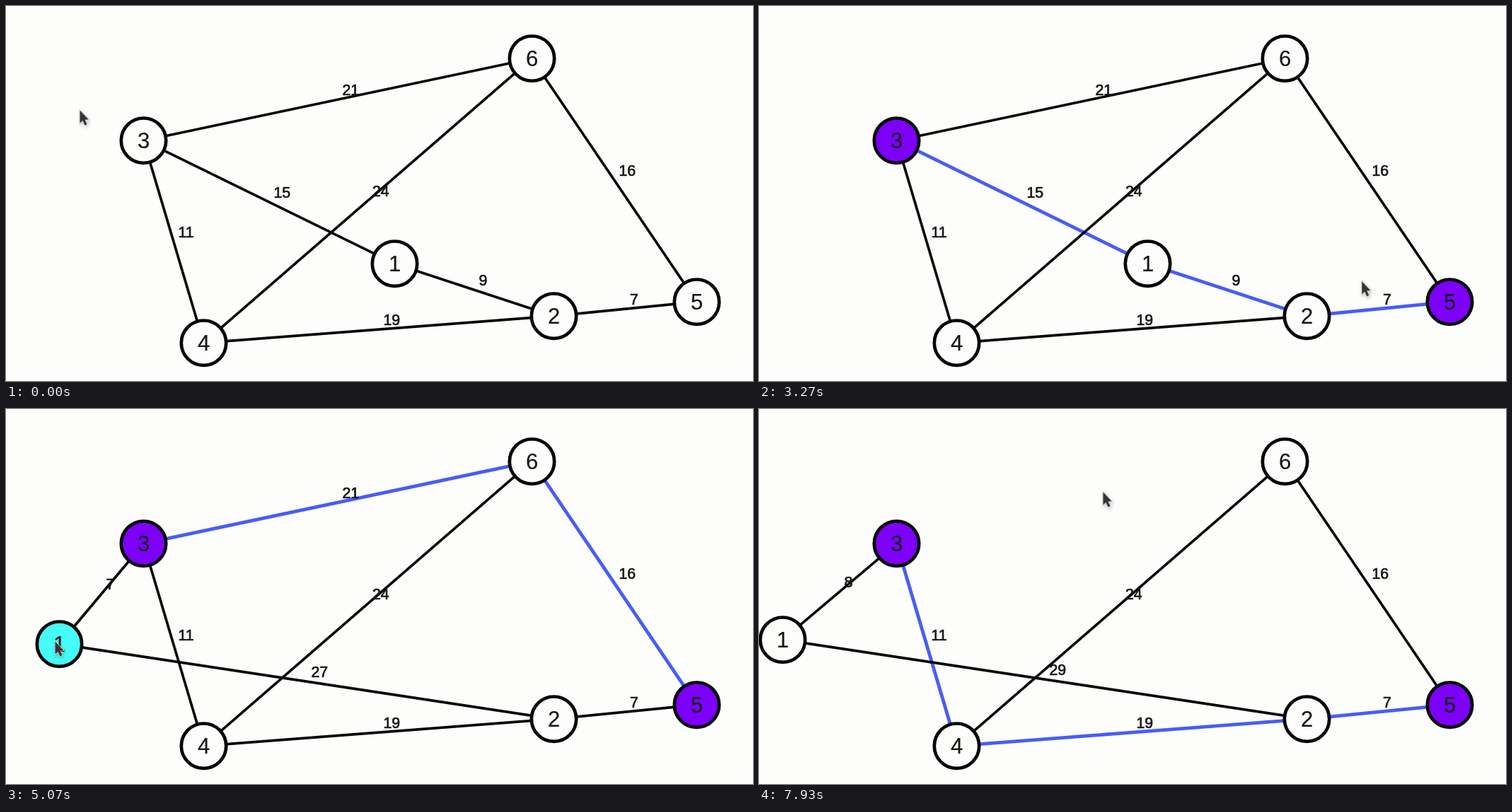
Write an HTML page with a canvas that moves like this. It is 1056x530 px and loops after 8 s.

```html
<!DOCTYPE html>
<html lang="en">
<head>
<meta charset="utf-8">
<title>Shortest path</title>
<style>
  html, body { margin: 0; width: 100%; height: 100%; overflow: hidden; background: #fdfdfb; }
  canvas { display: block; }
</style>
</head>
<body>
<canvas id="stage" width="1056" height="530"></canvas>
<script>
const ctx = document.getElementById('stage').getContext('2d');
const LOOP = 8000;
const FONT = '"Liberation Sans", Arial, sans-serif';
const PAPER = '#fdfdfb', INK = '#060606', TEXT = '#161616';
const BLUE = '#475cfa', PURPLE = '#7d00fb', CYAN = '#45fcf8';
const UNIT = 25.55; // pixels per unit of edge weight

// Moments in ms
const PICK_START = 930, PICK_END = 2130, GRAB = 4270, DROP = 5700, CUT = 7450;
const LAG = 60;

const home = {
  1: [549, 364], 2: [774, 438], 3: [194, 190],
  4: [279, 476], 5: [976, 418], 6: [743, 74]
};
const edges = ['36', '31', '34', '46', '12', '42', '25', '65'];
const routes = [['31', '12', '25'], ['36', '65'], ['34', '42', '25']];

// Pointer moves: begin, end, then where it comes to rest
const moves = [
  [70, 650, 196, 166],
  [1060, 1794, 972, 400],
  [2828, 4098, 543, 360],
  [4330, 4410, 526, 353],
  [4410, 4470, 511, 361],
  [4470, 5000, 69, 328],
  [5170, 5450, 27, 322],
  [5750, 6530, 437, 220],
  [6530, 7100, 486, 117]
];

const clamp = (v, lo, hi) => Math.min(Math.max(v, lo), hi);
const ease = u => u * u * (3 - 2 * u);

function pointerAt(t) {
  return moves.reduce(([x, y], [begin, end, toX, toY]) => {
    const k = ease(clamp((t - begin) / (end - begin), 0, 1));
    return [x + (toX - x) * k, y + (toY - y) * k];
  }, [104, 147]);
}

function layout(t) {
  if (t < GRAB) return home;
  const [x, y] = pointerAt(clamp(t - LAG, GRAB, DROP));
  return { ...home, 1: [x + 6, y + 4] };
}

function weight(nodes, [a, b]) {
  const p = nodes[a], q = nodes[b];
  return Math.floor(Math.hypot(p[0] - q[0], p[1] - q[1]) / UNIT);
}

function shortest(nodes, live) {
  const cost = r => r.reduce((sum, e) => sum + weight(nodes, e), 0);
  return routes.filter(r => r.every(e => live.includes(e)))
    .reduce((best, r) => cost(r) < cost(best) ? r : best);
}

function write(text, x, y, size, align, bold) {
  ctx.font = `${size}px ${FONT}`;
  ctx.textAlign = align;
  ctx.fillStyle = ctx.strokeStyle = TEXT;
  ctx.lineWidth = bold;
  ctx.fillText(text, x, y);
  ctx.strokeText(text, x, y);
}

function drawEdge(nodes, e, hot) {
  ctx.strokeStyle = hot ? BLUE : INK;
  ctx.lineWidth = hot ? 4.8 : 3.7;
  ctx.beginPath();
  ctx.moveTo(...nodes[e[0]]);
  ctx.lineTo(...nodes[e[1]]);
  ctx.stroke();
}

function drawWeight(nodes, e) {
  const p = nodes[e[0]], q = nodes[e[1]];
  write(weight(nodes, e), (p[0] + q[0]) / 2 + 6.5, (p[1] + q[1]) / 2 - 6.5, 21.3, 'left', 0.7);
}

function drawNode(name, [x, y], fill) {
  ctx.beginPath();
  ctx.arc(x, y, 31.7, 0, Math.PI * 2);
  ctx.fillStyle = fill;
  ctx.fill();
  ctx.strokeStyle = INK;
  ctx.lineWidth = 4.7;
  ctx.stroke();
  write(name, x, y + 10.5, 31, 'center', 0.2);
}

function drawPointer([x, y]) {
  ctx.save();
  ctx.translate(x, y);
  ctx.beginPath();
  ctx.moveTo(0.5, 0.5);
  for (const p of [[0.5, 18.5], [4.5, 15], [7.5, 21.5], [10.5, 20], [7.5, 13.8], [12.5, 13.2]]) ctx.lineTo(...p);
  ctx.closePath();
  ctx.shadowColor = 'rgba(0,0,0,.35)';
  ctx.shadowBlur = 4;
  ctx.shadowOffsetX = 1;
  ctx.shadowOffsetY = 2;
  ctx.strokeStyle = '#d8d8d8';
  ctx.lineWidth = 1.6;
  ctx.stroke();
  ctx.shadowColor = 'transparent';
  ctx.fillStyle = '#353535';
  ctx.fill();
  ctx.restore();
}

function nodeFill(name, t) {
  if (name === '3' && t >= PICK_START) return PURPLE;
  if (name === '5' && t >= PICK_END) return PURPLE;
  if (name === '1' && t >= GRAB && t < DROP) return CYAN;
  return PAPER;
}

function draw(t) {
  const nodes = layout(t);
  const live = edges.filter(e => e !== '36' || t < CUT);
  const hot = t >= PICK_END ? shortest(nodes, live) : [];
  ctx.fillStyle = PAPER;
  ctx.fillRect(0, 0, 1056, 530);
  ctx.save();
  ctx.translate(0.5, 0.2);
  for (const e of live) drawEdge(nodes, e, hot.includes(e));
  for (const e of live) drawWeight(nodes, e);
  for (const name in nodes) drawNode(name, nodes[name], nodeFill(name, t));
  ctx.restore();
  drawPointer(pointerAt(t));
}

const start = performance.now();
function tick() {
  draw((performance.now() - start) % LOOP);
  requestAnimationFrame(tick);
}
tick();
</script>
</body>
</html>
```
